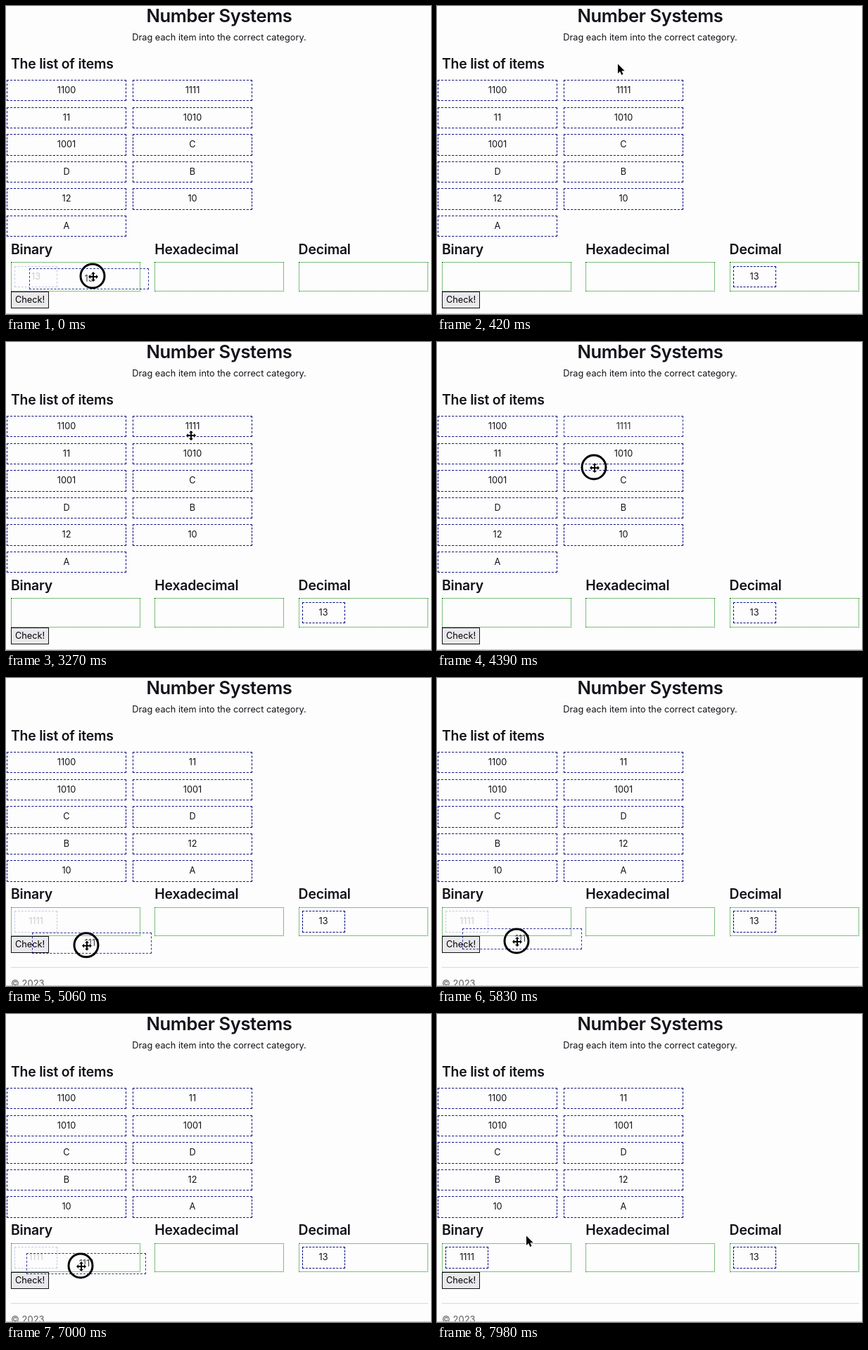
These frames come from a looping animation (604 px wide and 438 px high, 8000 ms). An HTML page:

```html
<!DOCTYPE html>
<html lang="en">
<head>
<meta charset="utf-8">
<title>Number Systems</title>
<style>
  html, body { margin: 0; width: 100%; height: 100%; overflow: hidden; background: #fdfdfd; }
  #stage {
    position: relative; width: 604px; height: 438px; overflow: hidden;
    font: 12.75px/30px Inter, sans-serif; color: #12121a; white-space: nowrap;
  }
  #stage * { box-sizing: border-box; }
  #stage > *, #lower > * { position: absolute; margin: 0; }
  h1 { top: -1px; width: 606px; text-align: center; font-size: 25.6px; font-weight: 600; letter-spacing: -.4px; }
  h2 { font-size: 19.4px; font-weight: 600; letter-spacing: -.2px; }
  .lead { top: 30px; width: 606px; text-align: center; }
  .item {
    left: 0; top: 0; width: 170px; height: 30.4px; border: 1px dashed navy;
    text-align: center; line-height: 27px;
  }
  .small { width: 61px; }
  .zone { top: 364.4px; width: 184px; height: 41.4px; border: 1px dotted green; }
  .check {
    left: 7px; top: 405.8px; width: 54px; height: 24px; line-height: 22px;
    border: 1px solid #111; background: #e9e9ed; color: #000; text-align: center;
  }
  #lower { left: 0; top: 0; }
  .rule { left: 7px; top: 450px; width: 593px; height: 1px; background: #d8d8da; }
  .foot { left: 7px; top: 458px; font-size: 13px; color: #5c5c60; }
  .edge { left: 0; top: 437px; width: 604px; height: 1px; background: #c8c8c8; }
  svg { left: 0; top: 0; }
</style>
</head>
<body>
<div id="stage">
  <h1>Number Systems</h1>
  <p class="lead">Drag each item into the correct category.</p>
  <h2 style="left:7px;top:67px">The list of items</h2>
  <div id="lower">
    <div class="check">Check!</div>
    <div class="rule"></div>
    <div class="foot">© 2023</div>
  </div>
  <div class="edge"></div>
</div>
<script>
const LOOP = 8000, ROW = 38.6, HELD_Y = 369.8;
const DROP_A = 270, PRESS = 3850, FOLLOW = 4620, ENTER = 5040, DROP_B = 7700;
const LIST = '1100 1111 11 1010 1001 C D B 12 10 A'.split(' ');
const zoneX = i => 7 + 204.3 * i;

// pointer moves; it rests in between
const HOME = { x: 123, y: 384 };
const MOVES = [
  { from: 20, to: 250, x: 452, y: 388 },
  { from: 290, to: 420, x: 257, y: 82 },
  { from: 2170, to: 3270, x: 262, y: 132 },
  { from: 3370, to: PRESS, x: 257, y: 123 },
  { from: PRESS, to: 4390, x: 223, y: 178 },
  { from: FOLLOW, to: 4880, x: 114, y: 380 },
  { from: ENTER, to: 5830, x: 113, y: 374 },
  { from: 5930, to: 7000, x: 106, y: 358 },
  { from: DROP_B, to: 7980, x: 127, y: 315 }
];

const stage = document.getElementById('stage');
const lower = document.getElementById('lower');

function add(parent, tag, cls, text = '') {
  const el = document.createElement(tag);
  el.className = cls;
  el.textContent = text;
  parent.append(el);
  return el;
}

function place(el, x, y, opacity = 1) {
  el.style.left = x + 'px';
  el.style.top = y + 'px';
  el.style.opacity = opacity;
}

const show = (el, on) => { el.style.display = on ? '' : 'none'; };

['Binary', 'Hexadecimal', 'Decimal'].forEach((name, i) => {
  place(add(lower, 'h2', '', name), zoneX(i), 331);
  add(lower, 'div', 'zone').style.left = zoneX(i) + 'px';
});

const items = LIST.map(text => add(stage, 'div', 'item', text));
const held13 = add(lower, 'div', 'item small', '13');
const held1111 = add(lower, 'div', 'item small', '1111');
const clone = add(stage, 'div', 'item');

stage.insertAdjacentHTML('beforeend', `
  <svg width="604" height="438">
    <g id="pointer">
      <circle id="ring" r="17" fill="none" stroke="#000" stroke-width="3"/>
      <path id="move" transform="translate(1 1)" stroke="#fff" stroke-width="1.6" paint-order="stroke"
        d="M0-7 3-4H1V-1H4V-3L7 0 4 3V1H1V4H3L0 7-3 4H-1V1H-4V3L-7 0-4-3V-1H-1V-4H-3Z"/>
      <path id="arrow" stroke="#fff" stroke-width="2" paint-order="stroke"
        d="M0 .5V14L3.1 11.1 5.3 16 7.5 15 5.4 10.3H9.7Z"/>
    </g>
  </svg>`);
const [pointer, ring, move, arrow] =
  ['pointer', 'ring', 'move', 'arrow'].map(id => document.getElementById(id));

function pointerAt(t) {
  let { x, y } = HOME;
  for (const m of MOVES) {
    const k = Math.min(1, Math.max(0, (t - m.from) / (m.to - m.from)));
    x += (m.x - x) * k;
    y += (m.y - y) * k;
  }
  return [x, y];
}

function render(t) {
  const [x, y] = pointerAt(t);
  const dragA = t < DROP_A;
  const dragB = t >= PRESS && t < DROP_B;
  const dragging = dragA || dragB;
  const entered = t >= ENTER;

  // the list closes up and everything below rises by one row
  lower.style.top = (entered ? -ROW : 0) + 'px';
  show(items[1], !entered);
  items.filter(el => !entered || el !== items[1]).forEach((el, i) => {
    const ghost = dragB && el === items[1];
    place(el, i % 2 ? 180 : 1, 105 + ROW * (i >> 1), ghost ? .2 : 1);
  });

  const zone = dragA ? Math.floor((x + 3) / 204.3) : 2;
  place(held13, zoneX(zone) + 5, HELD_Y, dragA ? .2 : 1);
  show(held1111, entered);
  place(held1111, zoneX(0) + 5, HELD_Y, dragB ? .2 : 1);

  // the dragged copy lags at its slot before it follows the pointer
  show(clone, dragging);
  clone.textContent = dragA ? '13' : '1111';
  if (dragA) place(clone, x - 90, y - 11, .8);
  else if (t < FOLLOW) place(clone, 180, 105, .8);
  else place(clone, x - 77, y - 18, .8);

  const overItem = t > DROP_A && t < PRESS && y >= 105 && y < 135;
  pointer.setAttribute('transform', `translate(${x} ${y})`);
  show(ring, dragging);
  show(move, dragging || overItem);
  show(arrow, !dragging && !overItem);
}

const start = performance.now();
function tick() {
  render((performance.now() - start) % LOOP);
  requestAnimationFrame(tick);
}
tick();
</script>
</body>
</html>
```
